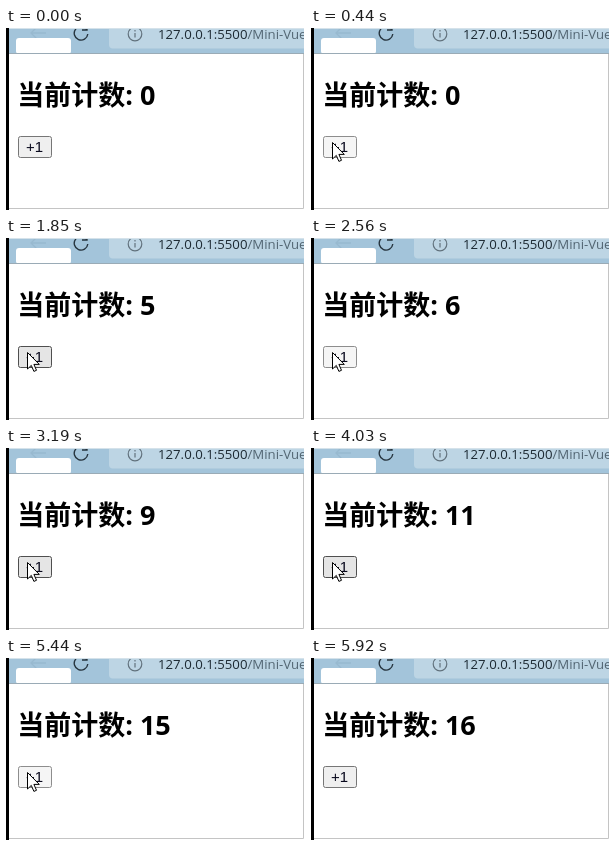
These frames come from a looping animation (299x182 px, 6.15 s). An HTML page:

```html
<!DOCTYPE html>
<html lang="zh">
<head>
<meta charset="utf-8">
<style>
  html, body { margin: 0; width: 100%; height: 100%; overflow: hidden; background: #fff; }
  svg { display: block; width: 299px; height: 182px; }
  .url { font: 13.2px "Open Sans", "Noto Sans", sans-serif; }
  .count { font: bold 27px "Open Sans", "Noto Sans CJK SC", "Noto Sans CJK", sans-serif; }
  .label { font: 15px "Liberation Sans", Arial, sans-serif; fill: #08081c; }
  #button { fill: #efefef; stroke: #767676; }
  #button.hover { fill: #e5e5e5; stroke: #4f4f4f; }
  #button.pressed { fill: #f5f5f5; stroke: #8d8d8d; }
</style>
</head>
<body>
<svg viewBox="0 0 299 182">
  <!-- browser toolbar -->
  <rect width="299" height="26" fill="#a3c4da"/>
  <rect x="103" y="-10" width="210" height="30.5" rx="4" fill="#bdd5e4"/>
  <path d="M25 5H40M31-1L25 5L31 11" fill="none" stroke="#98b9cf" stroke-width="1.3"/>
  <path d="M80.5 1.2A6.8 6.8 0 1 0 81.8 6M81-3V2H76" fill="none" stroke="#26343e" stroke-width="1.4"/>
  <g fill="none" stroke="#62727d" stroke-width="1.2">
    <circle cx="129" cy="6" r="6.8"/>
    <path d="M129 5V9.5M129 2V3.4"/>
  </g>
  <text class="url" x="152" y="11" fill="#1d2a33">127.0.0.1:5500<tspan fill="#526572">/Mini-Vue</tspan></text>
  <rect x="10" y="10" width="55" height="16" rx="3" fill="#fff"/>
  <path d="M3 25.5H299" stroke="#9aabb6"/>
  <path d="M0 .5H299" stroke="#d5e2ea"/>
  <path d="M298.5 0V26" stroke="#fff"/>

  <!-- page -->
  <rect y="26" width="299" height="156" fill="#fff"/>
  <path d="M297.5 26V180.5H3" fill="none" stroke="#c4c4c4"/>
  <rect width="3" height="182" fill="#000"/>
  <text class="count" x="11.2" y="76.5">当前计数: <tspan id="count">0</tspan></text>
  <rect id="button" x="12.5" y="108.5" width="33" height="21" rx="2"/>
  <text class="label" x="20" y="124">+1</text>
  <path id="cursor" d="M0 0V16.5L3.8 12.9L6.4 18.9L9 17.8L6.4 11.9H11.8Z"
        fill="#fff" stroke="#000" stroke-linejoin="round"/>
</svg>
<script>
const LOOP = 6150, TICK = 5550 / 71, HOLD = 80;
const ENTER = 130, ARRIVE = 360, LEAVE = 5680, GONE = 5914;
const [count, button, cursor] =
  ["count", "button", "cursor"].map(id => document.getElementById(id));

// Evenly spaced clicks; the counter goes up as each one is released
const burst = (start, length, gap) => Array.from({ length }, (_, i) => start + i * gap);
const clicks = [520, ...burst(980, 4, 290), ...burst(2320, 4, 290), ...burst(3650, 7, 310)];

// The pointer comes and goes along one diagonal, redrawn once per tick
function pointerDistance(t) {
  const time = ENTER + Math.floor((t - ENTER) / TICK) * TICK;
  return Math.max(0, (ARRIVE - time) / 480, (time - LEAVE) / (2 * TICK));
}

function draw(t) {
  const visible = t >= ENTER && t < GONE;
  const distance = pointerDistance(t);
  const x = 21.5 + 41 * distance, y = 114.5 + 53 * distance;
  const pressed = clicks.some(time => t >= time - HOLD && t < time);
  const hover = visible && y < 130;
  button.setAttribute("class", pressed ? "pressed" : hover ? "hover" : "");
  cursor.setAttribute("visibility", visible ? "visible" : "hidden");
  cursor.setAttribute("transform", `translate(${x} ${y})`);
  count.textContent = clicks.filter(time => t >= time).length;
}

const start = performance.now();
function frame() {
  draw((performance.now() - start) % LOOP);
  requestAnimationFrame(frame);
}
frame();
</script>
</body>
</html>
```
